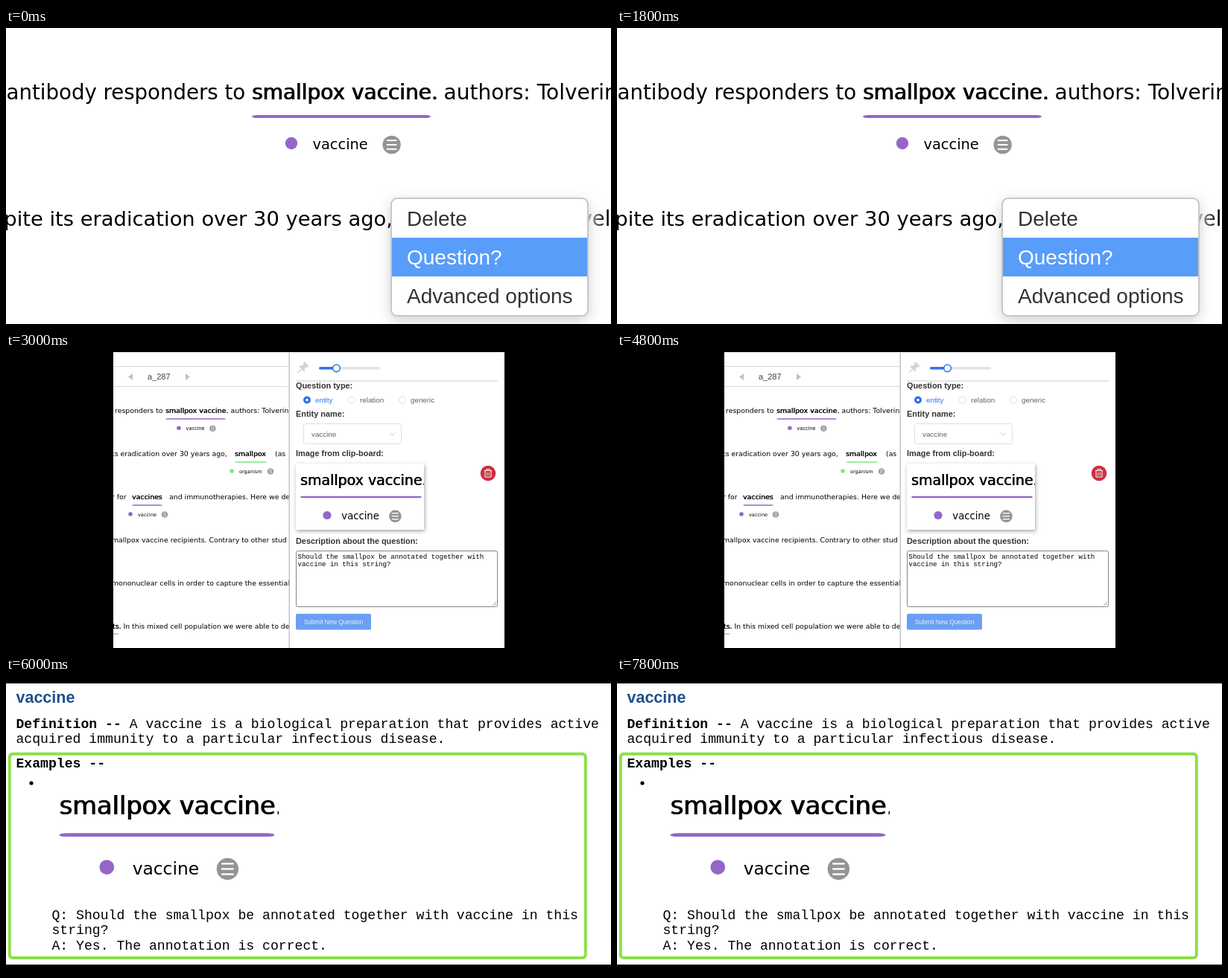
Recreate the animation shown at these times as an HTML page with a canvas. Size 812 by 398 pixels, loop 9000 ms.

```html
<!DOCTYPE html>
<html lang="en">
<head>
<meta charset="utf-8">
<title>Annotation question</title>
<style>
html, body { margin: 0; width: 100%; height: 100%; overflow: hidden; background: #fff; }
canvas { display: block; }
</style>
</head>
<body>
<canvas id="stage" width="812" height="398"></canvas>
<script>
const ctx = document.getElementById('stage').getContext('2d');
const READER = '"DejaVu Sans", sans-serif';
const UI = '"Liberation Sans", Arial, sans-serif';
const MONO = '"Liberation Mono", "Courier New", monospace';
const PURPLE = '#9467c6', BLUE = '#2f74ea', INK = '#333', GREY = '#606266', PALE = '#dcdfe6';
const SCENE_MS = 3000;

function text(str, x, y, size, family, color = '#000', weight = 'normal') {
  ctx.font = `${weight} ${size}px ${family}`;
  ctx.fillStyle = color;
  ctx.fillText(str, x, y);
}

// Regular weight thickened by a slight offset, like a text shadow.
function strongText(str, x, y, size) {
  text(str, x, y, size, READER);
  text(str, x + size * 0.035, y, size, READER);
}

function rect(x, y, w, h, color) {
  ctx.fillStyle = color;
  ctx.fillRect(x, y, w, h);
}

function disc(x, y, r, color) {
  ctx.fillStyle = color;
  ctx.beginPath();
  ctx.arc(x, y, r, 0, Math.PI * 2);
  ctx.fill();
}

function ring(x, y, r, color, width) {
  ctx.strokeStyle = color;
  ctx.lineWidth = width;
  ctx.beginPath();
  ctx.arc(x, y, r, 0, Math.PI * 2);
  ctx.stroke();
}

function path(points, color, width, fill = false) {
  ctx.beginPath();
  points.forEach(([x, y]) => ctx.lineTo(x, y));
  if (fill) {
    ctx.fillStyle = color;
    ctx.fill();
  } else {
    ctx.strokeStyle = color;
    ctx.lineWidth = width;
    ctx.stroke();
  }
}

function box(x, y, w, h, r, fill, stroke, width = 1) {
  ctx.beginPath();
  ctx.roundRect(x, y, w, h, r);
  if (fill) { ctx.fillStyle = fill; ctx.fill(); }
  if (stroke) { ctx.strokeStyle = stroke; ctx.lineWidth = width; ctx.stroke(); }
}

function withShadow(color, blur, dx, dy, draw) {
  ctx.save();
  ctx.shadowColor = color;
  ctx.shadowBlur = blur;
  ctx.shadowOffsetX = dx;
  ctx.shadowOffsetY = dy;
  draw();
  ctx.restore();
}

function clipped(x, y, w, h, draw) {
  ctx.save();
  ctx.beginPath();
  ctx.rect(x, y, w, h);
  ctx.clip();
  draw();
  ctx.restore();
}

// Bar whose ends taper gently.
function underline(x, y, w, thick, color) {
  box(x, y - thick / 2, w, thick, { x: thick * 2, y: thick / 2 }, color);
}

function listIcon(x, y, r) {
  disc(x, y, r, '#949494');
  for (const dy of [-0.48, 0, 0.48]) {
    rect(x - r * 0.56, y + r * dy - r * 0.08, r * 1.12, r * 0.16, '#fff');
  }
}

// Marked phrase with its underline, entity dot, label and icon.
function vaccinePhrase(x, y, scale) {
  ctx.save();
  ctx.translate(x, y);
  ctx.scale(scale, scale);
  strongText('smallpox vaccine.', -0.3, -23, 27.95);
  underline(0, 0, 240, 4, PURPLE);
  disc(53, 36, 8.2, PURPLE);
  text('vaccine', 81.5, 44, 19.4, READER);
  listIcon(187.6, 38, 12.2);
  ctx.restore();
}

function smallMark(word, x, y, w, label, dotX, iconX, color) {
  strongText(word, x, y, 9.35);
  underline(x, y + 8, w, 1.5, color);
  disc(dotX, y + 20, 2.8, color);
  text(label, dotX + 10, y + 23, 6.55, READER);
  listIcon(iconX, y + 20.5, 4.1);
}

function contextMenu() {
  rect(0, 0, 812, 398, '#fff');
  text('antibody responders to', 0.6, 96, 27.6, READER);
  vaccinePhrase(330, 119, 1);
  text('authors: Tolverin', 587.5, 96, 28, READER);
  text('pite its eradication over 30 years ago,', -2.7, 266, 27.35, READER);
  const fade = ctx.createLinearGradient(781, 0, 806, 0);
  fade.addColorStop(0, '#bbb');
  fade.addColorStop(1, '#000');
  text('vel', 770.5, 266, 27.5, READER, fade);

  withShadow('rgba(0,0,0,.2)', 18, 0, 5, () => box(517, 229, 264, 158, 8, '#fff'));
  box(517, 229, 264, 158, 8, '#fff', '#c8c8c8', 2);
  rect(518, 282, 262, 52, '#589df9');
  text('Delete', 538, 266, 28, UI, INK);
  text('Question?', 538, 318, 28, UI, '#fff');
  text('Advanced options', 538, 370, 28, UI, INK);
}

function documentPane() {
  rect(144, 0, 236, 1, '#d4d4d4');
  rect(144, 19, 236, 1, '#d8d8d8');
  rect(144, 46, 236, 1, '#d8d8d8');
  path([[170, 29], [170, 38], [164, 33.5]], '#c0c0c0', 0, true);
  path([[241, 29], [241, 38], [247, 33.5]], '#c0c0c0', 0, true);
  text('a_287', 190, 37, 11, UI, '#444');

  const line = (str, x, y) => text(str, x, y, 9.35, READER);
  line('responders to', 146, 82);
  vaccinePhrase(214, 90, 0.3375);
  line('authors: Tolverin', 301.5, 82);

  line('ts eradication over 30 years ago,', 142, 140);
  smallMark('smallpox', 307, 140, 43, 'organism', 303, 355, '#7bea7b');
  line('(as', 361, 140);

  line('r for', 142, 198);
  smallMark('vaccines', 169, 198, 41, 'vaccine', 167, 213, PURPLE);
  line('and immunotherapies. Here we de', 219, 198);

  line('mallpox vaccine recipients. Contrary to other stud', 142, 256);
  line('mononuclear cells in order to capture the essential', 142, 314);

  strongText('ts.', 143, 372, 9.35);
  underline(140, 379, 12, 1.5, '#f0a860');
  text('In this mixed cell population we were able to de', 157.5, 372, 9.3, READER);
}

function pin() {
  ctx.save();
  ctx.translate(398, 21.5);
  ctx.rotate(Math.PI / 4);
  rect(-4, -8, 8, 3, '#d4d4d4');
  rect(-2.5, -6, 5, 6, '#d4d4d4');
  path([[-5.5, 2], [-2.5, -2], [2.5, -2], [5.5, 2]], '#d4d4d4', 0, true);
  rect(-0.7, 2, 1.4, 7, '#d4d4d4');
  ctx.restore();
}

function radio(x, label, on) {
  if (on) {
    disc(x, 64.5, 5, BLUE);
    disc(x, 64.5, 1.7, '#fff');
  } else {
    ring(x, 64.5, 4.5, PALE, 1);
  }
  text(label, x + 11, 67.5, 9.8, UI, on ? BLUE : GREY);
}

function trashButton(x, y) {
  disc(x, y, 10.3, '#cb2f3f');
  ctx.save();
  ctx.translate(x, y);
  path([[-5, -3.5], [5, -3.5]], '#fff', 1);
  path([[-2, -3.5], [-2, -5.5], [2, -5.5], [2, -3.5]], '#fff', 1);
  path([[-4, -3.5], [-4, 5], [4, 5], [4, -3.5]], '#fff', 1);
  path([[-1.3, -1], [-1.3, 3]], '#fff', 0.9);
  path([[1.3, -1], [1.3, 3]], '#fff', 0.9);
  ctx.restore();
}

function questionPane() {
  const heading = (str, y) => text(str, 389, y, 10.9, UI, INK, 'bold');
  rect(380, 0, 289, 1, '#d4d4d4');
  rect(379.5, 0, 1.5, 398, '#c4c4c8');
  pin();
  box(420, 20, 82, 3.6, 1.8, '#e1e4ea');
  box(420, 20, 24, 3.6, 1.8, BLUE);
  disc(443.5, 21.8, 5, '#fff');
  ring(443.5, 21.8, 4.8, BLUE, 1.6);
  rect(389, 38.5, 271, 1, '#ccc');

  heading('Question type:', 49);
  radio(404, 'entity', true);
  radio(464, 'relation', false);
  radio(532, 'generic', false);

  heading('Entity name:', 87);
  box(399.5, 96.5, 131, 27, 3, '#fff', PALE);
  text('vaccine', 410, 114, 9.8, UI, GREY);
  path([[515, 108.5], [518.5, 112], [522, 108.5]], '#c0c4cc', 1);

  heading('Image from clip-board:', 140);
  withShadow('rgba(0,0,0,.35)', 5, 1, 2, () => rect(389, 150, 172, 89, '#fff'));
  clipped(389, 150, 172, 89, () => vaccinePhrase(395, 195, 0.679));
  trashButton(647, 163);

  heading('Description about the question:', 258);
  box(389.5, 267.5, 270, 75, 2, '#fff', '#858585');
  text('Should the smallpox be annotated together with', 391.5, 278, 9.05, MONO);
  text('vaccine in this string?', 391.5, 288, 9.05, MONO);
  path([[653, 341], [658, 336]], '#888', 0.8);
  path([[656, 341], [658, 339]], '#888', 0.8);

  box(389, 352, 101, 21.5, 2, '#6b9ff4');
  text('Submit New Question', 400, 365.5, 8.2, UI, '#e8f0fd');
}

function questionForm() {
  rect(0, 0, 812, 398, '#000');
  rect(144, 0, 525, 398, '#fff');
  clipped(144, 0, 236, 398, documentPane);
  questionPane();
}

function guideline() {
  const mono = (str, x, y, weight) => text(str, x, y, 18.12, MONO, '#000', weight);
  rect(0, 0, 812, 398, '#000');
  rect(0, 10, 812, 378, '#fff');
  text('vaccine', 13.5, 36, 21.5, UI, '#1f4f8f', 'bold');
  mono('Definition --', 13.5, 70, 'bold');
  mono(' '.repeat(14) + 'A vaccine is a biological preparation that provides active', 13.5, 70);
  mono('acquired immunity to a particular infectious disease.', 13.5, 90);

  box(4.8, 104.8, 773, 274.2, 4, null, '#8ddf4a', 4);
  mono('Examples --', 13.5, 123, 'bold');
  disc(34, 144, 2.6, '#000');
  clipped(60, 150, 306, 135, () => vaccinePhrase(71.5, 213.7, 1.204));
  mono('Q: Should the smallpox be annotated together with vaccine in this', 61.5, 327);
  mono('string?', 61.5, 347);
  mono('A: Yes. The annotation is correct.', 61.5, 368);
}

const scenes = [contextMenu, questionForm, guideline];
const start = performance.now();

function tick() {
  const elapsed = performance.now() - start;
  scenes[Math.floor(elapsed / SCENE_MS) % scenes.length]();
  requestAnimationFrame(tick);
}
tick();
</script>
</body>
</html>
```
